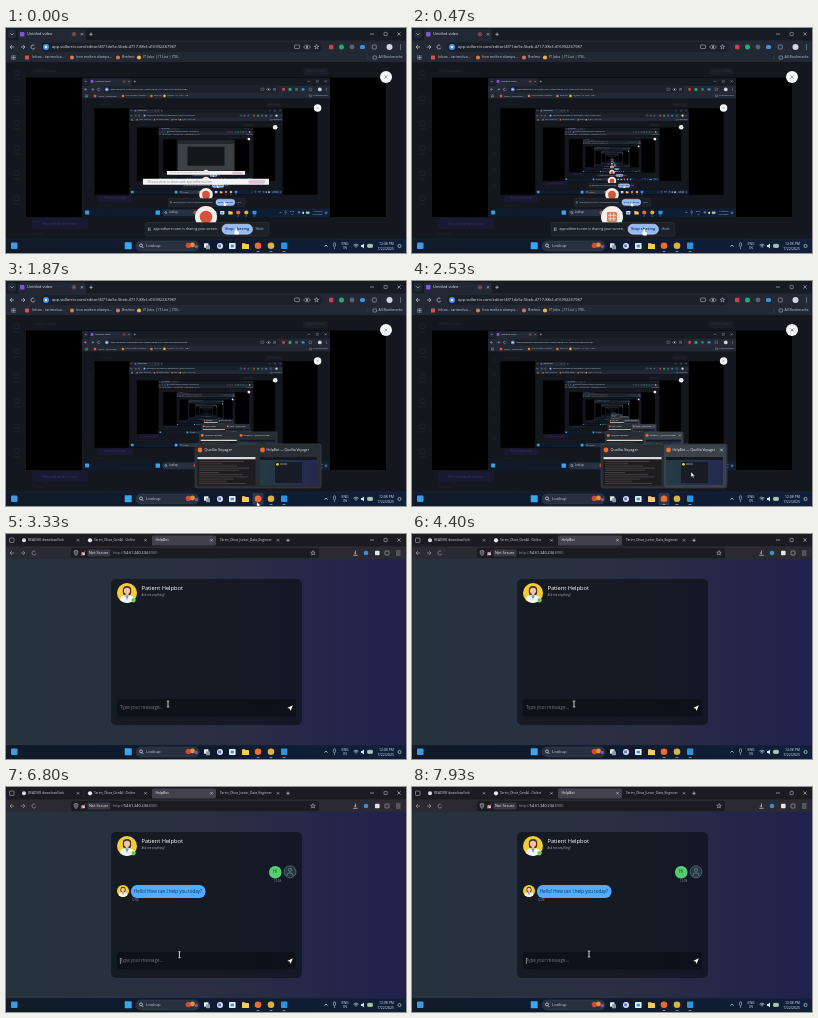
Recreate the animation shown at these times as an HTML page with a canvas. Size 400 by 225 pixels, loop 8000 ms.

```html
<!DOCTYPE html>
<html lang="en">
<head>
<meta charset="utf-8">
<title>Screen recording</title>
<style>
html, body { margin: 0; width: 100%; height: 100%; overflow: hidden; background: #10131b; }
canvas { display: block; width: 100vw; height: 100vh; }
</style>
</head>
<body>
<canvas id="stage"></canvas>
<script>
const LOOP = 8000, W = 400, H = 225;
const SWITCH = 2600, STOP_ICON = 450, BAR_OFF = 1250, POPUP_ON = 1640, POPUP_OFF = 2900;
const SENT = 5600, REPLY = 6540;
const NEST = { x: 76, y: 49.6, s: 0.62, lag: 70 };
const FONT = '"Open Sans", "Noto Sans", sans-serif';
const canvas = document.getElementById('stage');
const c = canvas.getContext('2d');

function box(x, y, w, h, fill, r = 0, stroke) {
  c.beginPath();
  c.roundRect(x, y, w, h, r);
  if (fill) { c.fillStyle = fill; c.fill(); }
  if (stroke) { c.strokeStyle = stroke; c.lineWidth = 0.5; c.stroke(); }
}
function dot(x, y, r, fill, stroke, lw = 0.7) {
  c.beginPath();
  c.arc(x, y, r, 0, 7);
  if (fill) { c.fillStyle = fill; c.fill(); }
  if (stroke) { c.strokeStyle = stroke; c.lineWidth = lw; c.stroke(); }
}
function line(points, color, lw = 0.7) {
  c.beginPath();
  for (let i = 0; i < points.length; i += 2) c.lineTo(points[i], points[i + 1]);
  c.strokeStyle = color;
  c.lineWidth = lw;
  c.stroke();
}
function poly(points, fill, stroke) {
  c.beginPath();
  for (let i = 0; i < points.length; i += 2) c.lineTo(points[i], points[i + 1]);
  c.closePath();
  c.fillStyle = fill;
  c.fill();
  if (stroke) { c.strokeStyle = stroke; c.lineWidth = 0.4; c.stroke(); }
}
function text(s, x, y, size, color, align = 'left', weight = 400) {
  c.font = `${weight} ${size}px ${FONT}`;
  c.textAlign = align;
  c.textBaseline = 'middle';
  c.fillStyle = color;
  c.fillText(s, x, y);
}
function clipped(x, y, w, h, draw) {
  c.save();
  c.beginPath();
  c.rect(x, y, w, h);
  c.clip();
  draw();
  c.restore();
}
function gradient(x0, x1, ...stops) {
  const g = c.createLinearGradient(x0, 0, x1, 0);
  stops.forEach((col, i) => g.addColorStop(i / (stops.length - 1), col));
  return g;
}
function cross(x, y, r, color, lw = 0.6) {
  line([x - r, y - r, x + r, y + r], color, lw);
  line([x + r, y - r, x - r, y + r], color, lw);
}
function plus(x, y, color) {
  line([x - 1.7, y, x + 1.7, y], color);
  line([x, y - 1.7, x, y + 1.7], color);
}
function navIcons(y, xs, color) {
  const [back, next, reload] = xs;
  line([back + 2, y, back - 2, y], color);
  line([back, y - 2, back - 2, y, back, y + 2], color);
  line([next - 2, y, next + 2, y], color);
  line([next, y - 2, next + 2, y, next, y + 2], color);
  c.beginPath();
  c.arc(reload, y, 2, 0.3, 5.4);
  c.stroke();
}
function windowButtons(y, color) {
  line([364, y, 368, y], color, 0.6);
  box(378, y - 1.6, 3.2, 3.2, null, 0.4, color);
  cross(393, y, 1.6, color);
}
function star(x, y, color) {
  const p = [];
  for (let i = 0; i < 11; i++) {
    const a = i * Math.PI / 5 - Math.PI / 2, r = i % 2 ? 1 : 2.4;
    p.push(x + r * Math.cos(a), y + r * Math.sin(a));
  }
  line(p, color, 0.5);
}

// Pointer position: [time, x, y]
const PATH = [[0, 230, 201], [450, 232, 202], [950, 252, 202], [1350, 252, 202],
  [1640, 250, 220], [1950, 251, 221], [2450, 279, 191], [2950, 279, 191],
  [3300, 162, 170], [6480, 162, 170], [6950, 177, 167], [8000, 177, 167]];

function pointer(t) {
  let i = 0;
  while (i < PATH.length - 2 && t > PATH[i + 1][0]) i++;
  const [t0, x0, y0] = PATH[i], [t1, x1, y1] = PATH[i + 1];
  const k = Math.max(0, Math.min(1, (t - t0) / (t1 - t0)));
  const e = k * k * (3 - 2 * k);
  return [x0 + (x1 - x0) * e, y0 + (y1 - y0) * e];
}
function drawPointer(t) {
  const [x, y] = pointer(t);
  if (t > 3180) {
    if (t > 4700 && t < 6480) return;
    line([x - 1.3, y - 3, x + 1.3, y - 3], '#fff', 0.6);
    line([x, y - 3, x, y + 3], '#fff', 0.8);
    line([x - 1.3, y + 3, x + 1.3, y + 3], '#fff', 0.6);
  } else if (t < 1450) {
    box(x - 0.6, y - 1, 1.4, 4.5, '#fff', 0.6);
    box(x - 1.6, y + 2, 4.4, 3.6, '#fff', 1.2);
  } else {
    poly([x, y, x, y + 5.2, x + 1.3, y + 4.1, x + 2.2, y + 6, x + 3, y + 5.6,
      x + 2.2, y + 3.8, x + 3.8, y + 3.7], '#fff', '#222');
  }
}

function taskbar(t) {
  box(0, 211, W, 14, gradient(0, W, '#101a28', '#0e1a2e', '#10203a'));
  line([0, 211, W, 211], '#273144', 0.4);
  box(5, 214.5, 6.5, 6.5, '#3f9be0', 1);
  box(118.7, 214.2, 7, 7, '#35a8ee', 0.5);
  box(130, 213, 63, 10, '#27313f', 5, '#3a4452');
  dot(135, 217.4, 1.5, null, '#dce3ea');
  line([136.1, 218.6, 137.4, 220], '#dce3ea');
  text('Lookup', 140, 218, 4.2, '#c3cad2');
  dot(182.5, 217.5, 2.8, '#d8472f');
  dot(186.5, 217, 2.4, '#e0913c');
  dot(190.2, 218.5, 1.7, '#9150ae');
  box(198, 215.2, 4.5, 4.5, '#e6e9ed', 0.5);
  box(200, 217.2, 4, 4, '#8f98a5', 0.5);
  dot(214, 218, 3, '#dfe1f2');
  box(212.2, 216.4, 2.8, 2.8, '#6a70c4', 0.5);
  box(223, 215, 6.6, 6, '#e9edf2', 0.8);
  box(224.7, 216.7, 3.2, 2.7, '#3c94d8');
  box(236, 215, 3.3, 2, '#e2a62e', 0.5);
  box(236, 216, 7, 5, '#f5cc57', 0.6);
  if (t > 1580 && t < 3000) box(246.5, 212, 11, 12, '#2c394c', 1.5);
  dot(252, 217.7, 3.3, '#f26b2c');
  dot(265, 217.7, 3.3, '#dfb33b');
  box(275, 214.6, 6.3, 6.3, '#2c93dc', 0.8);
  for (const x of [252, 265, 278]) box(x - 1.5, 223, 3, 0.8, '#7db9e6', 0.4);
  const ink = '#dfe4ea';
  line([318.4, 218.6, 320, 217, 321.6, 218.6], ink);
  box(327.5, 214.7, 2, 4, null, 1, ink);
  line([328.5, 219.3, 328.5, 221], ink, 0.5);
  text('ENG', 339, 215.8, 3.4, ink, 'center');
  text('IN', 339, 220.5, 3.4, ink, 'center');
  for (const r of [1.2, 2.5, 3.8]) {
    c.beginPath();
    c.arc(350, 220, r, -2.3, -0.84);
    c.strokeStyle = ink;
    c.lineWidth = 0.6;
    c.stroke();
  }
  poly([355, 217, 356.2, 217, 358, 215.5, 358, 220.5, 356.2, 219, 355, 219], ink);
  box(361.5, 216.3, 5, 3.2, '#a8c8a8', 0.7, ink);
  text('12:08 PM', 388, 215.6, 3.5, ink, 'right');
  text('7/22/2025', 388, 220.6, 3.5, ink, 'right');
  dot(393.5, 218, 1.6, null, ink, 0.6);
}

function editorBrowser() {
  const ink = '#c5cad2';
  box(0, 0, W, 12.5, '#171b23');
  box(2, 1.5, 8, 9, '#232a35', 2);
  line([4.5, 5.4, 6, 6.9, 7.5, 5.4], ink);
  box(12, 1.5, 68, 12, '#222934', 2.5);
  box(14, 4, 4.5, 4.5, '#8951df', 1);
  text('Untitled video', 21, 6.3, 3.9, '#e1e4ec');
  dot(68, 6.3, 1.8, null, '#b8606a', 0.6);
  dot(68, 6.3, 0.9, '#dc4c58');
  cross(76, 6.3, 1.2, ink);
  plus(85, 6.3, ink);
  windowButtons(6, ink);
  box(0, 12.5, W, 21.5, '#222934');
  navIcons(19, [6, 17, 27], ink);
  box(35, 14, 281, 10, '#1b212b', 5);
  dot(40, 19, 3, '#4b91e6');
  dot(40, 19, 1.2, '#e8eef9');
  text('app.vidlorrin.com/editor/4f71de5e-5beb-4717-88cf-d16992267987', 46, 19, 4.02, '#dce0e9');
  box(288.5, 17, 5, 3.5, null, 0.5, ink);
  line([297.5, 19, 299.5, 17.3, 302.5, 17.3, 304.5, 19, 302.5, 20.7, 299.5, 20.7, 297.5, 19], ink, 0.5);
  dot(301, 19, 0.9, ink);
  star(310.5, 19, ink);
  box(323, 16.8, 4.4, 4.4, '#c94442', 1);
  dot(335.5, 19, 2.5, '#25ac72');
  dot(346, 19, 2.4, '#5b626d');
  box(354, 17, 5, 4, '#3c91dc', 1.6);
  box(366.3, 17, 4, 4, null, 0.6, ink);
  dot(383.5, 19, 3, '#cfd8e2');
  for (const y of [17, 19, 21]) dot(394.5, y, 0.5, ink);
  for (let i = 0; i < 9; i++) box(5.5 + (i % 3) * 1.5, 27.6 + Math.floor(i / 3) * 1.5, 0.9, 0.9, ink);
  box(19, 27.5, 4, 4, '#dd5146', 0.5);
  text('Inbox - tarimolva...', 26, 29.5, 3.75, ink);
  dot(66, 29.5, 2, '#e77c37');
  text('Iron molten olamps...', 70, 29.5, 3.65, ink);
  dot(112, 29.5, 2, '#d97a55');
  text('Brelmo', 116, 29.5, 3.7, ink);
  dot(133, 29.5, 2.1, '#f0b43c');
  text('IT Jobs | IT List | ITB...', 137, 29.5, 3.7, ink);
  line([362, 27, 362, 32], '#4b525e', 0.4);
  box(367, 28, 3.5, 3, null, 0.4, ink);
  text('All Bookmarks', 372.5, 29.5, 3.6, ink);
}

function sharingBar(t) {
  const [px] = pointer(t);
  box(139, 194.5, 124, 13.5, '#1c2028', 2.5, '#343b49');
  line([142.4, 199.5, 142.4, 203], '#d2d6dc', 0.6);
  line([144, 199.5, 144, 203], '#d2d6dc', 0.6);
  text('app.vidlorrin.com is sharing your screen.', 147.5, 201.3, 3.4, '#d8dce3');
  box(216, 196.2, 30.5, 10, '#95bbf7', 5, px < 246 ? '#e2edff' : '#6389cc');
  text('Stop sharing', 231.2, 201.3, 4, '#172b52', 'center', 600);
  text('Hide', 249.5, 201.3, 3.8, '#94b7ef');
}

function popup(t) {
  const hover = pointer(t)[1] < 209;
  box(189, 163, 126, 44, '#292d34', 2, '#454a52');
  if (hover) box(252, 163.5, 62, 43, '#3c424b', 2);
  dot(194, 169, 2.4, '#f26b2c');
  text('Quellia Voyager', 198.5, 169, 3.8, '#f0f2f5');
  dot(256.5, 169, 2.4, '#f26b2c');
  text('HelpBot — Quellia Voyager', 260.5, 169, 3.4, '#f0f2f5');
  if (hover) cross(309.5, 169, 1.4, '#e5e8ec');
  box(191.5, 176, 58, 28.5, '#1d1c1f');
  box(191.5, 176, 58, 2.2, '#d8d9dc');
  for (let i = 0; i < 11; i++) {
    const w = 18 + 32 * Math.abs(Math.sin(i * 2.3 + 1));
    line([193, 180.5 + i * 2.2, 193 + w, 180.5 + i * 2.2], i % 3 ? '#55504f' : '#65504a', 0.7);
  }
  box(254, 176, 57, 28, gradient(254, 311, '#263b43', '#25284f'));
  box(254, 176, 57, 3, '#17171e');
  box(269, 181, 27, 21, '#171c27', 1.2);
  dot(271.5, 183.3, 1.4, '#efc92f');
  line([274, 183, 281, 183], '#cdd0d5', 0.6);
}

function recordButton(t) {
  dot(200, 189, 11, '#f6f0ec');
  if (t < STOP_ICON) return dot(200, 189, 6.3, '#d8513b');
  box(195, 184, 10, 10, '#dc7a68', 1.2);
  for (const d of [-1.7, 1.7]) {
    line([200 + d, 185, 200 + d, 193], '#f6ded6', 0.8);
    line([196, 189 + d, 204, 189 + d], '#f6ded6', 0.8);
  }
}

function editorPage(t, level) {
  box(0, 34, W, 177, '#14171d');
  for (let i = 0; i < 6; i++) {
    box(8, 43 + i * 25, 5, 4.5, null, 1, '#282c38');
    line([6.5, 51 + i * 25, 14.5, 51 + i * 25], '#20242c', 0.8);
  }
  box(297, 40, 25, 7, '#1a1c26', 1.5);
  text('Export video', 309.5, 43.5, 3.4, '#343845', 'center');
  text('Untitled video', 27, 43.5, 3.6, '#2c303a');
  box(26, 190, 56, 11, '#1b1932', 2);
  text('Record and create', 54, 195.5, 4.2, '#39336c', 'center');
  text('Timeline', 26, 206, 3.4, '#292c36');
  box(20, 49.6, 360, 139.5, '#000');
  c.save();
  c.translate(NEST.x, NEST.y);
  c.scale(NEST.s, NEST.s);
  clipped(0, 0, W, H, () => editor(t - NEST.lag, level + 1));
  c.restore();
  if (t < BAR_OFF) recordButton(t);
  dot(380, 49, 6, '#f5f6f8');
  cross(380, 49, 1.6, '#6b6f76', 0.6);
}

function editor(t, level) {
  if (level > 12) return box(0, 0, W, H, '#0a0c11');
  if (t < -250) {
    box(0, 0, W, H, '#1b1d21');
    box(10, 32, 380, 180, '#3d4044');
    box(10, 8, 380, 24, '#24272c');
    box(75, 50, 250, 130, '#15171a');
    return;
  }
  editorBrowser();
  editorPage(t, level);
  if (t < BAR_OFF) sharingBar(t);
  if (t < -100) {
    box(36, 183, 328, 16, '#f5f3f4', 2);
    text('Choose what to share with app.vidlorrin.com', 48, 191, 8, '#8c8590');
    box(310, 186, 44, 10, '#dcc3d8', 5);
  }
  taskbar(t);
  if (t >= POPUP_ON) popup(t);
  drawPointer(t);
}

function chatBrowser() {
  const ink = '#d0d0d8', dim = '#9898a4';
  box(0, 0, W, 12.5, '#1c1b22');
  box(3.5, 4, 4.5, 4.5, null, 1, ink);
  dot(18, 6.3, 2, '#dcdee3');
  text('README download link', 22, 6.3, 3.35, ink);
  cross(72, 6.3, 1.2, ink, 0.5);
  line([78, 3, 78, 10], '#44434d', 0.4);
  dot(84, 6.3, 2.1, '#eceef0');
  clipped(88, 0, 42, 12, () => text('Tarim_Olvar_GenAI - Online 1', 88, 6.3, 3.25, ink));
  cross(139.5, 6.3, 1.2, ink, 0.5);
  box(146, 1.5, 64, 10, '#42414d', 1.6);
  text('HelpBot', 149.5, 6.3, 3.5, '#fafafd');
  cross(205.5, 6.3, 1.2, '#f0f0f4', 0.5);
  clipped(213, 0, 56, 12, () => text('Tarim_Olvar_Junior_Data_Engineer', 214, 6.3, 3.25, ink));
  cross(272, 6.3, 1.2, ink, 0.5);
  plus(282, 6.3, ink);
  windowButtons(6, ink);
  box(0, 12.5, W, 12.5, '#2b2a33');
  navIcons(19, [6, 17, 28], dim);
  box(65, 14, 248, 10, '#1c1b22', 1.6);
  poly([68, 17, 70, 16.3, 72, 17, 71.6, 20, 70, 21.7, 68.4, 20], '#55545f', ink);
  box(75.5, 18.2, 3.4, 3, ink, 0.5);
  line([79.5, 16.5, 75, 21.8], '#e24e59', 0.7);
  box(81.5, 15.4, 23, 7.2, '#383742', 1);
  text('Not Secure', 83, 19, 3.8, '#f0f0f5');
  text('http://', 107, 19, 3.7, dim);
  const x = 107 + c.measureText('http://').width;
  text('54.61.240.234', x, 19, 3.7, '#f4f4f8');
  text(':8080', x + c.measureText('54.61.240.234').width, 19, 3.7, dim);
  star(307, 19, ink);
  line([349.5, 16.5, 349.5, 20, 348, 18.6], ink);
  line([347.3, 21.3, 351.7, 21.3], ink);
  dot(360, 19, 2.3, '#3f8ed5');
  box(369, 16.7, 4.6, 4.6, '#e4e5eb', 0.8);
  box(379, 17, 4, 4, null, 0.7, ink);
  for (const y of [17, 19, 21]) line([390, y, 394.5, y], ink, 0.5);
}

function doctor(x, y, r) {
  c.save();
  c.beginPath();
  c.arc(x, y, r, 0, 7);
  c.clip();
  c.translate(x, y);
  c.scale(r / 10, r / 10);
  box(-10, -10, 20, 20, '#f3cd37');
  box(-4.2, -7, 8.4, 10, '#4b3028', 4);
  poly([-8, 10, -6, 3.5, -1.5, 2, 1.5, 2, 6, 3.5, 8, 10], '#f3f5f7');
  box(-1.4, 0, 2.8, 4, '#e9b596');
  dot(0, -2.2, 3.1, '#f1c4a6');
  poly([-1.7, 2.5, 1.7, 2.5, 0, 7], '#62a5c9');
  c.restore();
}

function messages(t) {
  if (t < SENT) return;
  box(263, 79, 12.5, 12.5, '#58cc71', 6);
  text('Hi', 269.2, 85.2, 4.4, '#153d20', 'center');
  text('12:08', 275, 94, 2.8, '#8e929b', 'right');
  dot(284, 84.8, 6, '#283843', '#608491', 0.6);
  dot(284, 82.8, 1.6, null, '#78a1ad', 0.6);
  c.beginPath();
  c.arc(284, 88.8, 3, Math.PI, 0);
  c.stroke();
  if (t < REPLY) return;
  doctor(117, 104, 6);
  box(125, 98, 74.5, 13, '#52acff', 6);
  text('Hello! How can I help you today?', 128, 104.5, 4.5, '#102c4b');
  text('12:08', 125.5, 113.6, 2.8, '#8e929b');
}

function chat(t) {
  chatBrowser();
  box(0, 25, W, 186, gradient(0, W, 'rgb(38,51,61)', 'rgb(42,47,65)', 'rgb(33,33,78)'));
  box(105, 45, 191, 146, 'rgba(10,13,18,0.62)', 5);
  doctor(121, 59, 10);
  dot(127.3, 66, 2.1, '#4cd137', '#f4f6f4', 0.5);
  text('Patient Helpbot', 135.5, 55, 5.7, '#fff');
  text('Ask me anything!', 135.5, 61.3, 2.9, '#a8adb5');
  messages(t);
  box(111, 165, 179, 17.5, 'rgba(0,0,0,0.32)', 2.5);
  const typed = t >= SENT || t < 4730 ? '' : t < 5000 ? 'H' : 'Hi';
  if (typed) text(typed, 114, 174, 4.6, '#fff');
  else text('Type your message...', 114, 174, 4.4, '#757b85');
  c.font = `4.6px ${FONT}`;
  const caretX = 114 + c.measureText(typed).width + 0.4;
  const lit = t > 5000 && t < SENT || (t - 3500) % 1060 < 560 || t > 7740;
  if (t > 3500 && lit) line([caretX, 171, caretX, 177], '#eef0f3', 0.5);
  poly([281.2, 174, 286.8, 171.2, 284.6, 177, 283.6, 174.6], '#fff');
  taskbar(t);
  if (t < POPUP_OFF) popup(t);
  drawPointer(t);
}

function resize() {
  const dpr = window.devicePixelRatio || 1;
  canvas.width = Math.round(innerWidth * dpr);
  canvas.height = Math.round(innerHeight * dpr);
}
function frame() {
  const t = performance.now() % LOOP;
  c.setTransform(canvas.width / W, 0, 0, canvas.height / H, 0, 0);
  if (t < SWITCH) editor(t, 0);
  else chat(t);
  requestAnimationFrame(frame);
}
addEventListener('resize', resize);
resize();
frame();
</script>
</body>
</html>
```
